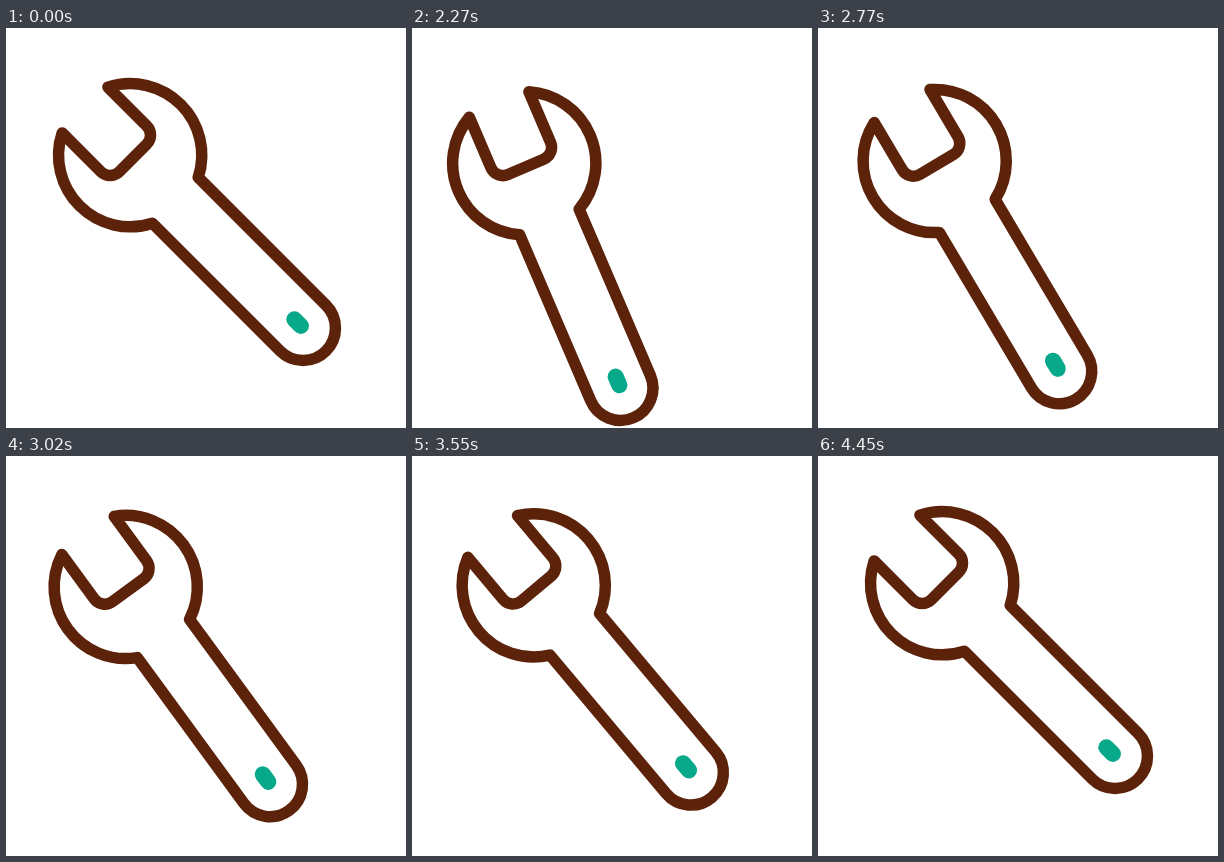
Recreate the animation shown at these times as an HTML page. Size 400x400 px, loop 4470 ms.

```html
<!DOCTYPE html>
<html lang="en">
<head>
<meta charset="utf-8">
<title>Wrench</title>
<style>
  html, body { margin: 0; width: 100%; height: 100%; overflow: hidden; background: #fff; }
  svg { display: block; width: 100%; height: 100%; }
</style>
</head>
<body>
<svg viewBox="0 0 400 400">
  <g id="wrench" fill="none" stroke-linecap="round" stroke-linejoin="round">
    <path id="body" stroke="#5c230a" stroke-width="11.5"/>
    <path id="hole" stroke="#08a88a" stroke-width="16.2"/>
  </g>
</svg>
<script>
const LOOP = 4470, START = 2020, STEP = 25;
const PIVOT = [97.3, 100.3], REST = 45;

// [time in ms, swing in degrees]
const KEYS = [
  [1986, 0], [2240, 22.5], [2567, -10.7], [2870, 22.5], [3208, -10.7],
  [3472, 0], [3706, 22.5], [3987, -10.7], [4445, 0]
];

const wrench = document.getElementById('wrench');

// The wrench lies along the x axis, with the pivot in its jaw at 0,0.
function drawShape() {
  const half = 32.4, head = 71.6, mid = 38, jaw = 42, r = 13, cap = 282.5;
  const reach = Math.sqrt(head * head - half * half);
  const tip = mid - reach, neck = mid + reach;
  document.getElementById('body').setAttribute('d', [
    `M${tip} ${-half}`,
    `A${head} ${head} 0 0 1 ${neck} ${-half}`,
    `H${cap}`,
    `A${half} ${half} 0 0 1 ${cap} ${half}`,
    `H${neck}`,
    `A${head} ${head} 0 0 1 ${tip} ${half}`,
    `H${jaw - r}`,
    `A${r} ${r} 0 0 0 ${jaw} ${half - r}`,
    `V${r - half}`,
    `A${r} ${r} 0 0 0 ${jaw - r} ${-half}`,
    'Z'
  ].join(''));
  document.getElementById('hole').setAttribute('d', 'M270.2 0H279.4');
}

const ease = p => (1 - Math.cos(Math.PI * p)) / 2;

function swing(t) {
  if (t < START) return 0;
  const time = START + Math.floor((t - START) / STEP) * STEP;
  const i = KEYS.findIndex(k => k[0] > time);
  if (i < 1) return 0;
  const [t0, a] = KEYS[i - 1], [t1, b] = KEYS[i];
  return a + (b - a) * ease((time - t0) / (t1 - t0));
}

function render(t) {
  wrench.setAttribute('transform', `translate(${PIVOT}) rotate(${REST + swing(t)})`);
}

drawShape();
render(0);
const begin = performance.now();
function tick() {
  render((performance.now() - begin) % LOOP);
  requestAnimationFrame(tick);
}
requestAnimationFrame(tick);
</script>
</body>
</html>
```
